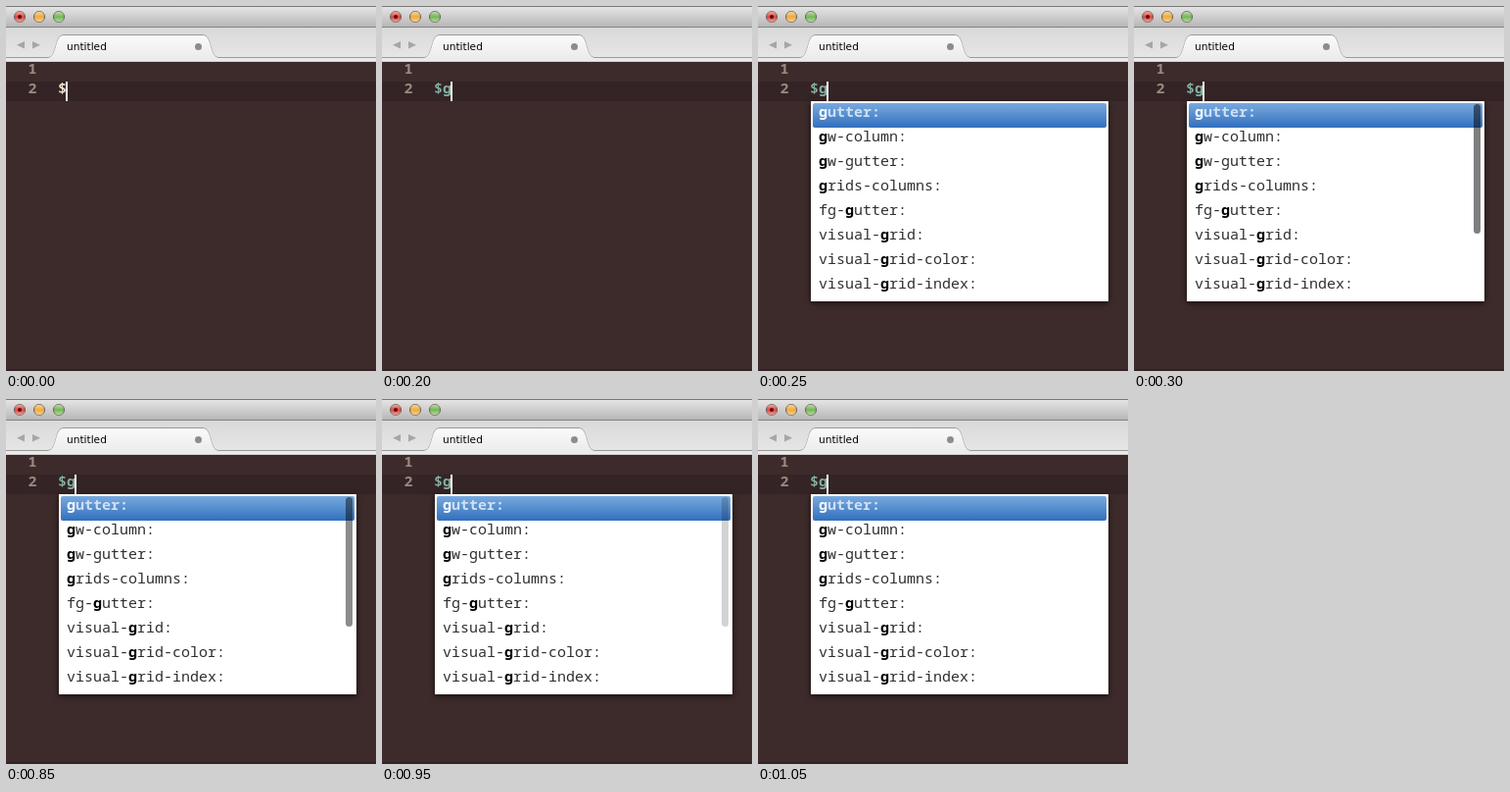
These frames come from a looping animation (378 by 372 pixels, 1500 ms). An HTML page:

```html
<!DOCTYPE html>
<html lang="en">
<head>
<meta charset="utf-8">
<title>Autocomplete</title>
<style>
  html, body { margin: 0; width: 100%; height: 100%; overflow: hidden; background: #3d2b2b; }
  svg { display: block; }
  .code { font: 15px "Noto Sans Mono", "DejaVu Sans Mono", monospace; white-space: pre; }
  .bold { font-weight: 700; }
  .hit { font-weight: 700; fill: #000; }
  .selected { fill: #cfe0f5; font-weight: 600; }
  .selected .hit { fill: #fff; }
  .tab { font: 10.6px "DejaVu Sans", sans-serif; }
  #popup { filter: drop-shadow(0 2px 3px rgba(0, 0, 0, .6)); }
</style>
</head>
<body>
<svg width="378" height="372" viewBox="0 0 378 372">
  <defs>
    <linearGradient id="title" x2="0" y2="1">
      <stop stop-color="#e6e6e6"/><stop offset="1" stop-color="#b5b5b5"/>
    </linearGradient>
    <linearGradient id="bar" x2="0" y2="1">
      <stop stop-color="#d9d9d9"/><stop offset="1" stop-color="#e6e6e6"/>
    </linearGradient>
    <linearGradient id="tab" x2="0" y2="1">
      <stop stop-color="#fafafa"/><stop offset="1" stop-color="#ececec"/>
    </linearGradient>
    <linearGradient id="blue" x2="0" y2="1">
      <stop stop-color="#78aadd"/><stop offset="1" stop-color="#326fbe"/>
    </linearGradient>
    <linearGradient id="gloss" x2="0" y2="1">
      <stop stop-color="#fff" stop-opacity=".55"/>
      <stop offset=".5" stop-color="#fff" stop-opacity="0"/>
      <stop offset="1" stop-color="#fff" stop-opacity=".5"/>
    </linearGradient>
  </defs>

  <rect width="378" height="372" fill="#3d2b2b"/>
  <rect y="77" width="378" height="20" fill="#352425"/>
  <rect y="370" width="378" height="2" fill="#342324"/>

  <rect width="378" height="22" fill="url(#title)"/>
  <rect width="378" height="1" fill="#777"/>
  <rect y="21" width="378" height="1" fill="#828282"/>
  <g id="lights"></g>

  <rect y="22" width="378" height="31" fill="url(#bar)"/>
  <rect y="52" width="378" height="5" fill="#ebebeb"/>
  <path d="M0 52.5H43C48 52 49 47 51 41C53 34 54 29.5 60 29.5H200C206 29.5 207 34 209 41C211 47 212 52 217 52.5H378" fill="none" stroke="#999"/>
  <path d="M43 53C48 52 49 47 51 41C53 34 54 30 60 30H200C206 30 207 34 209 41C211 47 212 52 217 53Z" fill="url(#tab)"/>
  <rect y="56" width="378" height="1" fill="#d4d2d2"/>
  <path d="M19 36v7.500l-8-3.750zM27 36v7.500l8-3.750z" fill="#a6a6a6"/>
  <text class="tab" x="62" y="45">untitled</text>
  <circle cx="196.500" cy="41.500" r="3.500" fill="#8c8c8c"/>

  <g class="code bold">
    <g fill="#9b8a80"><text x="22.500" y="69">1</text><text x="22.500" y="89">2</text></g>
    <text id="typed" x="53" y="89"></text>
  </g>
  <rect id="caret" y="77" width="2" height="20" fill="#f8f4ee"/>

  <g id="popup">
    <rect x="54" y="97" width="304" height="204" fill="#fff"/>
    <rect x="56" y="99" width="300" height="25" rx="2" fill="url(#blue)"/>
    <g id="rows" class="code" fill="#303030"></g>
    <rect id="scroll" x="347" y="100" width="7" height="132" rx="3.500"/>
  </g>
</svg>
<script>
const $ = id => document.getElementById(id);

$("lights").innerHTML = ["#e0453f", "#efab3c", "#74b853"].map((color, i) => {
  const ring = `cx="${14 + 20 * i}" cy="11" r="5.500"`;
  return `<circle ${ring} fill="${color}" stroke="#66594d"/><circle ${ring} fill="url(#gloss)"/>`;
}).join("") + '<circle cx="14" cy="11" r="2" fill="#5c0d0b"/>';

const items = ["gutter", "gw-column", "gw-gutter", "grids-columns", "fg-gutter",
  "visual-grid", "visual-grid-color", "visual-grid-index"];

$("rows").innerHTML = items.map((item, i) => {
  const at = item === "fg-gutter" ? 3 : item.indexOf("g");
  const label = `${item.slice(0, at)}<tspan class="hit">g</tspan>${item.slice(at + 1)}:`;
  return `<text x="62" y="${113 + 25 * i}"${i ? "" : ' class="selected"'}>${label}</text>`;
}).join("");

// Scrollbar appears at once, then fades in five 50 ms steps
function scrollAlpha(t) {
  if (t < 300) return 0;
  if (t < 850) return 1;
  const step = Math.min(5, Math.floor((t - 850) / 50) + 1);
  return (1 + Math.cos(Math.PI * step / 5)) / 2;
}

function draw(now) {
  const t = now % 1500;
  const typed = t >= 200;
  $("typed").textContent = typed ? "$g" : "$";
  $("typed").setAttribute("fill", typed ? "#80aea2" : "#f3e3cd");
  $("caret").setAttribute("x", typed ? 70 : 61);
  $("popup").style.display = t >= 250 ? "" : "none";
  $("scroll").setAttribute("opacity", 0.5 * scrollAlpha(t));
}

const start = performance.now();
function frame() {
  draw(performance.now() - start);
  requestAnimationFrame(frame);
}
frame();
</script>
</body>
</html>
```
